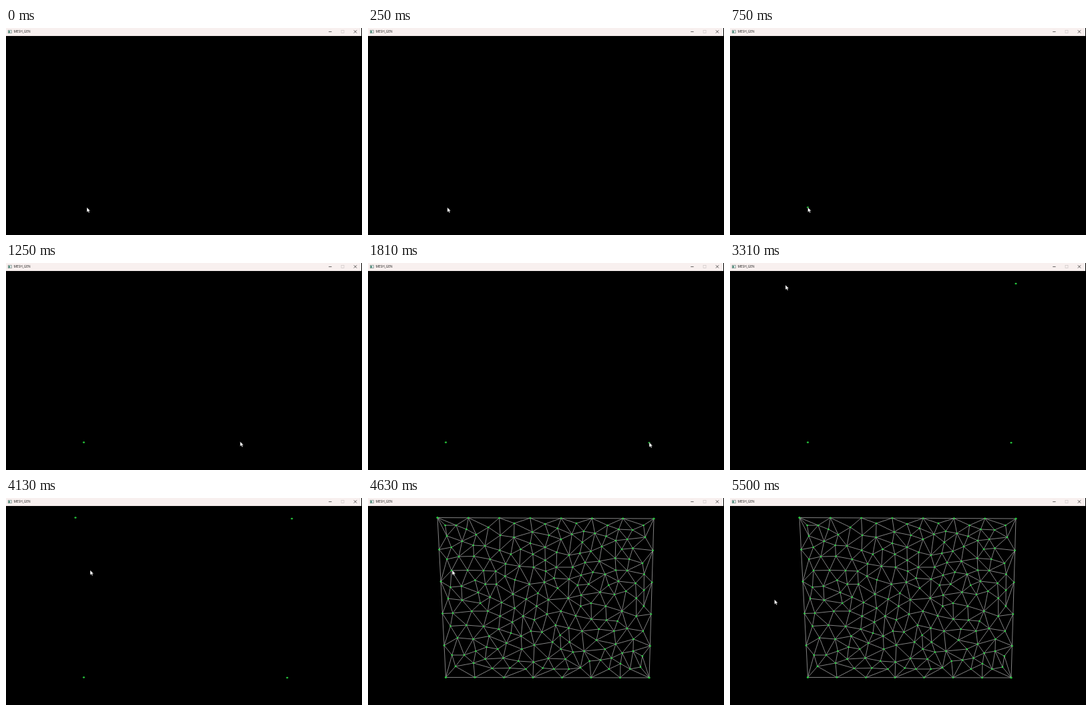
Write an HTML page that moves like this. It is 533 px wide and 311 px high and loops after 6310 ms.

```html
<!DOCTYPE html>
<html lang="en">
<head>
<meta charset="utf-8">
<title>MESH_GEN</title>
<style>
html, body { margin: 0; width: 100%; height: 100%; overflow: hidden; background: #000; }
svg { display: block; width: 100vw; height: 100vh; }
text { font: 4.8px "Open Sans", "Noto Sans", sans-serif; fill: #1a1a1a; }
</style>
</head>
<body>
<svg viewBox="0 0 533 311">
  <rect width="533" height="311"/>
  <rect width="532" height="12" fill="#f8f0ef"/>
  <rect x="3.2" y="3.2" width="5.4" height="4.6" fill="#dfe9e8" stroke="#75807f" stroke-width=".6"/>
  <rect x="3.6" y="4.2" width="2.3" height="3.2" fill="#4b8c78"/>
  <text x="11.5" y="7.4">MESH_GEN</text>
  <g fill="none" stroke="#222" stroke-width=".7">
    <path d="M483.2 5.6h4.4"/>
    <rect x="502" y="3.5" width="4" height="4" stroke="#cfc8c8"/>
    <path d="M520.8 3.3l4.3 4.3m0 -4.3l-4.3 4.3"/>
  </g>
  <path id="edges" fill="none" stroke="#dadada" stroke-width=".6"/>
  <g id="nodes" fill="#2bd043"></g>
  <g id="corners" fill="#25c53b"></g>
  <path id="cursor" d="M0 0V7.2L1.7 5.7L2.9 8.2L4.1 7.7L3 5.3H5.2Z" fill="#fff" stroke="#000" stroke-width=".35"/>
</svg>
<script>
const LOOP = 6310, MESH_AT = 4630;
const $ = id => document.getElementById(id);
const mix = (a, b, u) => a + (b - a) * u;
const dist = (a, b) => Math.hypot(a[0] - b[0], a[1] - b[1]);

// corners in click order, and the moment each one shows
const corners = [[116.5, 269.5], [421, 270], [428, 31], [104, 29.5]];
const shown = [750, 1810, 2810, 3810];
const divisions = [7, 5, 7, 5];

const seeds = [
  132,41, 219,38, 265,39, 312,38, 396,48,
  118,57, 162,55, 198,56, 246,51, 371,64,
  175,72, 289,62, 136,88, 265,74, 350,73,
  125,109, 206,99, 282,104, 325,97, 411,98,
  173,109, 220,123, 301,122, 388,109,
  120,151, 165,142, 200,157, 270,153, 334,158, 369,145,
  127,173, 249,183, 311,177, 134,210, 173,193, 388,196,
  144,236, 131,253, 158,248, 186,256, 249,221, 270,241, 318,255, 378,249, 408,254
];

function border() {
  const out = [];
  corners.forEach((a, i) => {
    const b = corners[(i + 1) % 4], n = divisions[i];
    for (let k = 0; k < n; k++) out.push([mix(a[0], b[0], k / n), mix(a[1], b[1], k / n)]);
  });
  return out;
}

// put a new point in the widest gap until no gap is wider than minGap
function fillGaps(pts, minGap) {
  const cells = [];
  for (let y = 41; y <= 258; y += 1.5) {
    const v = (y - 30) / 240;
    for (let x = mix(104, 116.5, v) + 11; x <= mix(428, 421, v) - 11; x += 1.5) {
      const p = [x, y];
      cells.push({ p, d: Math.min(...pts.map(q => dist(p, q))) });
    }
  }
  for (;;) {
    const best = cells.reduce((a, b) => b.d > a.d ? b : a);
    if (best.d < minGap) return;
    pts.push(best.p);
    for (const c of cells) c.d = Math.min(c.d, dist(c.p, best.p));
  }
}

function circle(a, b, c) {
  const bx = b[0] - a[0], by = b[1] - a[1], cx = c[0] - a[0], cy = c[1] - a[1];
  const det = 2 * (bx * cy - by * cx);
  if (Math.abs(det) < 40) return null;
  const bb = bx * bx + by * by, cc = cx * cx + cy * cy;
  const x = (cy * bb - by * cc) / det, y = (bx * cc - cx * bb) / det;
  return { p: [a[0] + x, a[1] + y], r: Math.hypot(x, y) };
}

// Delaunay edges: triples whose circumcircle is empty
function link(pts) {
  const reach = 64, edges = new Set();
  pts.forEach((a, i) => {
    const near = [];
    for (let j = i + 1; j < pts.length; j++) if (dist(a, pts[j]) < reach) near.push(j);
    near.forEach((j, n) => {
      for (const k of near.slice(n + 1)) {
        const o = circle(a, pts[j], pts[k]);
        if (!o || pts.some((q, m) => m !== i && m !== j && m !== k && dist(q, o.p) < o.r - 1e-6)) continue;
        for (const [s, e] of [[i, j], [i, k], [j, k]]) edges.add(`M${pts[s]}L${pts[e]}`);
      }
    });
  });
  return [...edges].join("");
}

function dot(parent, [cx, cy], rx, ry) {
  const el = document.createElementNS("http://www.w3.org/2000/svg", "ellipse");
  Object.entries({ cx, cy, rx, ry }).forEach(([k, v]) => el.setAttribute(k, v));
  parent.append(el);
  return el;
}

const points = border();
for (let i = 0; i < seeds.length; i += 2) points.push([seeds[i], seeds[i + 1]]);
fillGaps(points, 15.5);
$("edges").setAttribute("d", link(points));
points.forEach(p => dot($("nodes"), p, 1.4, 1.2));
const marks = corners.map(p => dot($("corners"), p, 1.6, 1.35));

// pointer moves: first and last change, end point, bend in y
const start = [121, 269.5];
const moves = [
  [60, 500, 116.5, 269.5],
  [810, 1380, 415, 268],
  [1440, 1750, 421, 269.5],
  [2000, 2440, 429.5, 34],
  [2690, 2690, 428.5, 30.5],
  [2810, 3310, 83, 33, 20],
  [3440, 3560, 104, 30],
  [3810, 4130, 126, 108.5],
  [5000, 5500, 66.5, 152.5]
];

function pointer(t) {
  let [x, y] = start;
  for (const [from, to, endX, endY, bend = 0] of moves) {
    if (t < from) break;
    const n = Math.round((to - from) / 63) + 1;
    const step = t >= to ? n : Math.floor((t - from) / (to - from) * (n - 1)) + 1;
    const s = step / n, u = s * s * (3 - 2 * s);
    x = mix(x, endX, u);
    y = mix(y, endY, u) + bend * 4 * u * (1 - u);
  }
  return [x, y];
}

function draw(t) {
  const mesh = t >= MESH_AT ? "visible" : "hidden";
  $("edges").setAttribute("visibility", mesh);
  $("nodes").setAttribute("visibility", mesh);
  marks.forEach((m, i) => m.setAttribute("visibility", t >= shown[i] ? "visible" : "hidden"));
  $("cursor").setAttribute("transform", `translate(${pointer(t)})`);
}

const began = performance.now();
function tick() {
  draw((performance.now() - began) % LOOP);
  requestAnimationFrame(tick);
}
tick();
</script>
</body>
</html>
```
